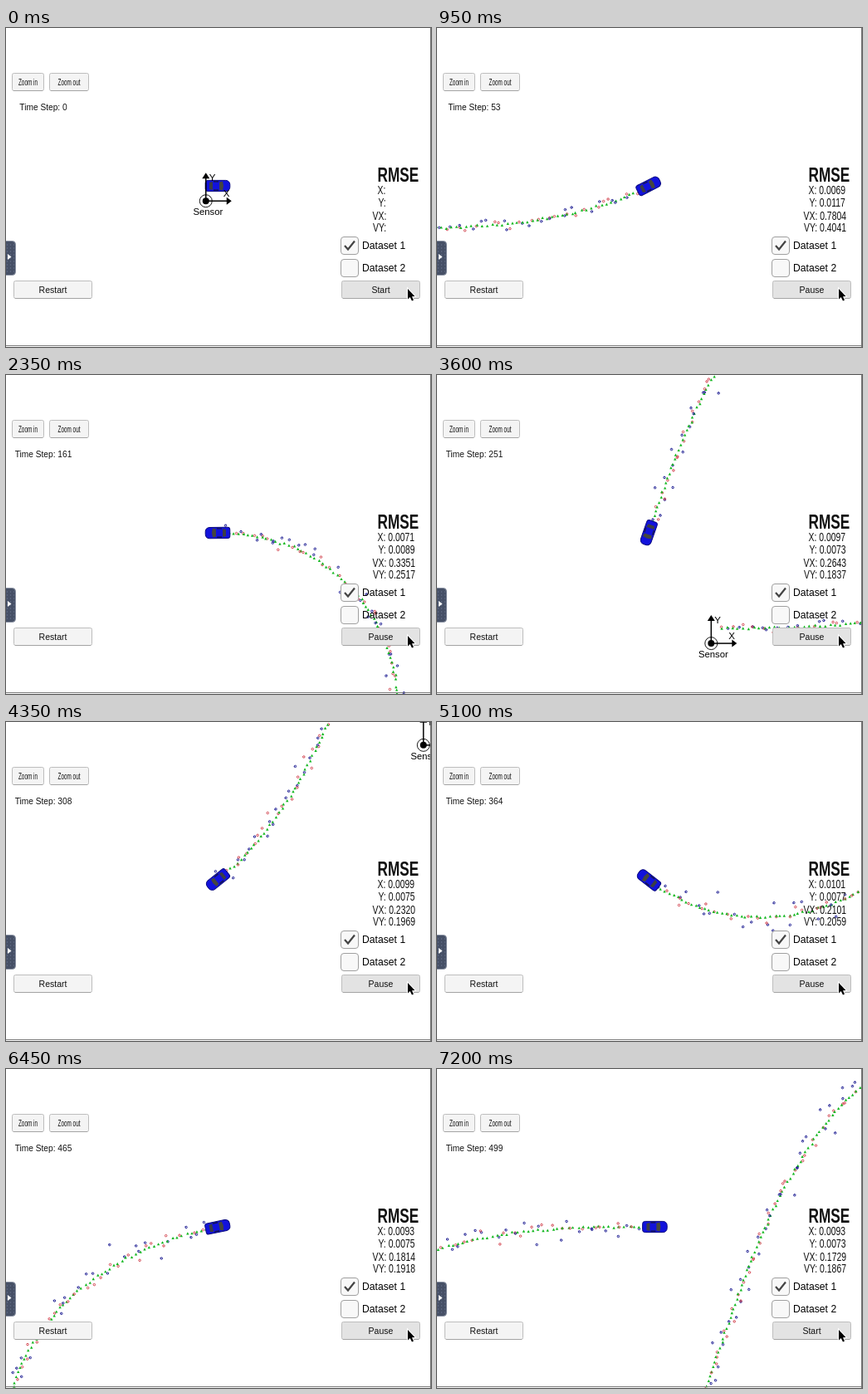
Recreate the animation shown at these times as an HTML page with a canvas. Size 512 px wide and 384 px high, loop 7.4 s.

```html
<!DOCTYPE html>
<html lang="en">
<head>
<meta charset="utf-8">
<title>Tracking simulator</title>
<style>
html, body { margin: 0; width: 100%; height: 100%; overflow: hidden; background: #fff; }
canvas { display: block; width: 512px; height: 384px; }
</style>
</head>
<body>
<canvas id="stage" width="512" height="384"></canvas>
<script>
const ctx = document.getElementById('stage').getContext('2d');
const FONT = '"Liberation Sans", Arial, sans-serif';
const LOOP = 7400, TICK = 50, SCALE = 23.7, LAST = 499;
const CX = 255, CY = 190;

// time (ms), step, then RMSE of x, y, vx, vy
const KEYS = [
  [150, 0, 0.02, 0.03, 0.95, 0.3],
  [950, 53, 0.0069, 0.0117, 0.7804, 0.4041],
  [2350, 161, 0.0071, 0.0089, 0.3351, 0.2517],
  [3600, 251, 0.0097, 0.0073, 0.2643, 0.1837],
  [5100, 364, 0.0101, 0.0077, 0.2101, 0.2059],
  [5750, 412, 0.0092, 0.0079, 0.1974, 0.2015],
  [6890, LAST, 0.0093, 0.0073, 0.1729, 0.1867]
];

let seed = 71;
function rand() {
  seed = (seed * 16807) % 2147483647;
  return seed / 2147483647;
}
function gauss() {
  return Math.sqrt(-2 * Math.log(rand())) * Math.cos(2 * Math.PI * rand());
}

// Figure-eight path in metres: yaw rate is one sine wave over 500 steps
const heading = k => 2.188 * (1 - Math.cos(2 * Math.PI * k / 500));
const path = [{ x: 0.6, y: 0.6 }];
for (let k = 0; k <= 501; k++) {
  const d = 0.05 * (5 + 0.2 * Math.cos(4 * Math.PI * (k + 0.5) / 500));
  const a = heading(k + 0.5), p = path[k];
  path.push({ x: p.x + d * Math.cos(a), y: p.y + d * Math.sin(a) });
}
function pathAt(k) {
  const i = Math.floor(k), f = k - i, p = path[i], q = path[i + 1];
  return { x: p.x + (q.x - p.x) * f, y: p.y + (q.y - p.y) * f };
}

// Lidar on even steps, radar on odd steps, plus the estimate
const marks = path.slice(0, LAST + 1).map((p, k) => {
  const est = { x: p.x + 0.03 * gauss(), y: p.y + 0.03 * gauss() };
  const radar = k % 2 === 1;
  let obs;
  if (radar) {
    const r = Math.hypot(p.x, p.y) + 0.26 * gauss();
    const a = Math.atan2(p.y, p.x) + 0.022 * gauss();
    obs = { x: r * Math.cos(a), y: r * Math.sin(a), a };
  } else {
    obs = { x: p.x + 0.14 * gauss(), y: p.y + 0.14 * gauss() };
  }
  return { est, obs, radar };
});

// squeeze: horizontal scale of the condensed labels
function text(str, x, y, size, opt = {}) {
  ctx.save();
  ctx.translate(x, y);
  ctx.scale(opt.squeeze || 1, 1);
  ctx.font = (opt.bold ? 'bold ' : '') + size + 'px ' + FONT;
  ctx.textAlign = opt.align || 'left';
  ctx.fillStyle = opt.color || '#111';
  ctx.fillText(str, 0, 0);
  ctx.restore();
}
function box(x, y, w, h, r, fill, stroke) {
  ctx.beginPath();
  ctx.roundRect(x + 0.5, y + 0.5, w - 1, h - 1, r);
  ctx.fillStyle = fill;
  ctx.fill();
  ctx.strokeStyle = stroke;
  ctx.lineWidth = 1;
  ctx.stroke();
}
function poly(points, fill) {
  ctx.beginPath();
  points.forEach(([x, y]) => ctx.lineTo(x, y));
  ctx.closePath();
  ctx.fillStyle = fill;
  ctx.fill();
}
function line(points, color, width) {
  ctx.beginPath();
  points.forEach(([x, y]) => ctx.lineTo(x, y));
  ctx.strokeStyle = color;
  ctx.lineWidth = width;
  ctx.stroke();
}
function disc(x, y, r, fill) {
  ctx.beginPath();
  ctx.arc(x, y, r, 0, 2 * Math.PI);
  ctx.fillStyle = fill;
  ctx.fill();
}
function ring(x, y, r, color) {
  ctx.beginPath();
  ctx.arc(x, y, r, 0, 2 * Math.PI);
  ctx.strokeStyle = color;
  ctx.lineWidth = 0.9;
  ctx.stroke();
}

function stateAt(t) {
  if (t < 200) return { step: 0, rmse: null, running: false };
  const end = KEYS[KEYS.length - 1];
  if (t >= end[0]) return { step: LAST, rmse: end.slice(2), running: false };
  const i = KEYS.findIndex(key => key[0] > t);
  const a = KEYS[i - 1], b = KEYS[i];
  const step = Math.round(a[1] + (b[1] - a[1]) * (t - a[0]) / (b[0] - a[0]));
  // running averages settle like 1 / step
  const inv = n => 1 / Math.max(n, 1);
  const u = (inv(a[1]) - inv(step)) / (inv(a[1]) - inv(b[1]));
  const rmse = a.slice(2).map((v, j) => v + (b[j + 2] - v) * u);
  return { step, rmse, running: true };
}

function drawTrail(step, toScreen) {
  for (let k = 0; k < step; k++) {
    const { est, obs, radar } = marks[k];
    const [ox, oy] = toScreen(obs);
    ring(ox, oy, 1.25, radar ? '#16168f' : '#cf3440');
    if (radar) line([[ox, oy], [ox + 1.7 * Math.cos(obs.a), oy - 1.7 * Math.sin(obs.a)]], '#16168f', 0.7);
    const [x, y] = toScreen(est);
    poly([[x, y - 1.9], [x + 1.7, y + 1.3], [x - 1.7, y + 1.3]], '#14b820');
  }
}

function drawCar(x, y, angle) {
  ctx.save();
  ctx.translate(x, y);
  ctx.rotate(-angle);
  ctx.beginPath();
  ctx.roundRect(-14.8, -6.6, 29.6, 13.2, [3, 5, 5, 3]);
  ctx.fillStyle = '#1212dc';
  ctx.fill();
  ctx.strokeStyle = '#0a0a80';
  ctx.lineWidth = 1;
  ctx.stroke();
  poly([[-10, -4], [-6, -5], [-6, 5], [-10, 4]], '#3b3d45');
  poly([[2, -4.5], [6, -5.5], [7, 0], [6, 5.5], [2, 4.5]], '#45463f');
  line([[-5, -5.1], [1, -5.1]], '#15154d', 1.4);
  line([[-5, 5.1], [1, 5.1]], '#15154d', 1.4);
  ctx.restore();
}

function drawSensor(x, y) {
  line([[x, y], [x, y - 28]], '#000', 1.5);
  line([[x, y], [x + 27, y]], '#000', 1.5);
  poly([[x, y - 34], [x + 4.5, y - 27], [x - 4.5, y - 27]], '#000');
  poly([[x + 31, y], [x + 25, y - 4.5], [x + 25, y + 4.5]], '#000');
  ring(x, y, 7.5, '#000');
  disc(x, y, 4, '#000');
  text('Y', x + 4, y - 24, 11.5, { color: '#000' });
  text('X', x + 21, y - 5, 11.5, { color: '#000' });
  text('Sensor', x + 2.5, y + 17, 11.3, { align: 'center', color: '#000' });
}

function button(label, x, y, w, fill, size, squeeze) {
  box(x, y, w, 22, 2, fill, '#bdbdbd');
  line([[x + 2, y + 21.5], [x + w - 2, y + 21.5]], '#a4a4a4', 1);
  text(label, x + w / 2, y + 14.8, size, { align: 'center', squeeze });
}

function drawPanel({ step, rmse, running }) {
  button('Zoom in', 7, 54, 39, '#f4f4f4', 10, 0.64);
  button('Zoom out', 52, 54, 48, '#f4f4f4', 10, 0.64);
  text('Time Step: ' + step, 45, 98.8, 10.2, { align: 'center' });

  text('RMSE', 447.5, 185, 23, { bold: true, squeeze: 0.75 });
  [['X:', 447.5, 200], ['Y:', 448.5, 215], ['VX:', 441.5, 231], ['VY:', 442, 245]]
    .forEach(([label, x, y], i) => {
      const value = rmse ? ' ' + rmse[i].toFixed(4) : '';
      text(label + value, x, y, 13.9, { squeeze: 0.75 });
    });

  box(403, 251, 22, 22, 3.5, '#f8f8f8', '#a0a0a0');
  box(403, 278, 22, 22, 3.5, '#f8f8f8', '#a0a0a0');
  line([[408, 262], [412, 266.5], [420, 256.5]], '#444', 2.2);
  text('Dataset 1', 429, 266, 12.2, { color: '#000' });
  text('Dataset 2', 429, 293, 12.2, { color: '#000' });

  button('Restart', 9, 304, 95, '#f4f4f4', 10.5);
  button(running ? 'Pause' : 'Start', 404, 304, 95, '#e3e3e3', 10.5);
}

function drawTab() {
  box(-5, 256, 17, 42, 4, '#465066', '#8a92a3');
  for (let y = 261; y < 296; y += 4) {
    for (let x = 1; x < 10; x += 4) disc(x + 0.5, y, 0.7, '#68738b');
  }
  poly([[2, 272], [6.5, 275.5], [2, 279]], '#fff');
}

function drawCursor() {
  ctx.beginPath();
  [[484, 314], [484, 326.5], [486.8, 324], [489, 328.5], [491, 327.5], [489, 323.2], [492.5, 323]]
    .forEach(([x, y]) => ctx.lineTo(x, y));
  ctx.closePath();
  ctx.strokeStyle = '#fff';
  ctx.lineWidth = 2;
  ctx.stroke();
  ctx.fillStyle = '#000';
  ctx.fill();
}

function draw(t) {
  const state = stateAt(t), { step } = state;
  // the car rolls on a little after the camera has stopped
  const pos = step === LAST ? 500 : step && step + 0.3;
  const cam = pathAt(Math.min(pos, 498.8));
  const toScreen = p => [CX + (p.x - cam.x) * SCALE, CY - (p.y - cam.y) * SCALE];

  ctx.fillStyle = '#fff';
  ctx.fillRect(0, 0, 512, 384);
  drawTrail(step, toScreen);
  drawCar(...toScreen(pathAt(pos)), heading(pos));
  const [sx, sy] = toScreen({ x: 0, y: 0 });
  drawSensor(sx, sy + 4);

  drawPanel(state);
  drawTab();
  line([[0, 382.5], [512, 382.5]], '#777', 1);
  line([[511.5, 0], [511.5, 384]], '#777', 1);
  drawCursor();
}

const start = performance.now();
function frame() {
  const t = (performance.now() - start) % LOOP;
  draw(Math.floor(t / TICK) * TICK);
  requestAnimationFrame(frame);
}
frame();
</script>
</body>
</html>
```
